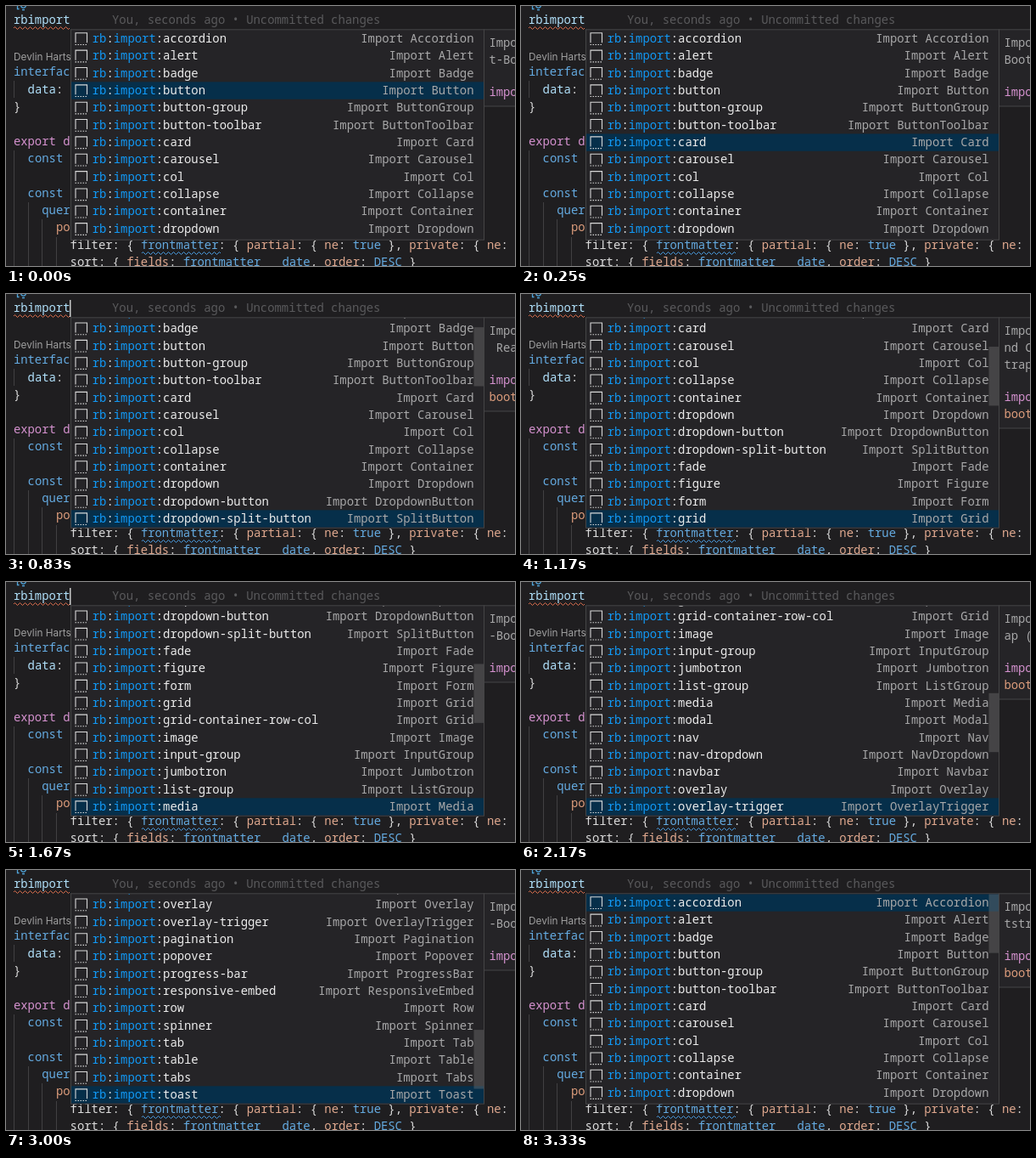
These frames come from a looping animation (600 by 306 pixels, 3.41 s). An HTML page:

```html
<!DOCTYPE html>
<html lang="en">
<head>
<meta charset="utf-8">
<title>Snippet suggestions</title>
<style>
  html, body { margin: 0; width: 100%; height: 100%; overflow: hidden; background: #1f1e20; }
  svg { display: block; width: 600px; height: 306px; }
  text { font: 500 13.88px "Noto Sans Mono", "DejaVu Sans Mono", monospace; white-space: pre; fill: #dcdcdc; }
  .lens { font: 11.8px Inter, Roboto, sans-serif; fill: #a0a0a0; }
  .blame { fill: #5a5a5c; font-weight: 400; }
  .key { fill: #64aae0; }
  .var { fill: #b0e0fa; }
  .flow { fill: #d592cf; }
  .str { fill: #dd9d7c; }
  .field { fill: #dfa88e; }
  .label { fill: #ececec; }
  .match { fill: #1199f6; }
  .detail { fill: #a8a8a9; font-weight: 400; }
  .panel { fill: #252427; stroke: #454546; }
  .icon { fill: none; stroke: #d8d8d8; stroke-width: 1.1; }
  .guide { stroke: #414042; }
  .wave { fill: none; stroke-width: 1; }
</style>
</head>
<body>
<svg id="stage" viewBox="0 0 600 306">
  <clipPath id="listClip"><rect x="77" y="28.3" width="487" height="246.4"/></clipPath>
  <g id="editor"></g>
  <rect id="cursor" x="75" y="7" width="1.5" height="20" fill="#c8c8c8"/>
  <g id="docs"></g>
  <rect class="panel" x="76.5" y="27.8" width="487" height="247.4"/>
  <g clip-path="url(#listClip)">
    <g id="list"><rect id="focus" x="77" width="486" height="20.35" fill="#062f4a"/></g>
    <rect id="thumb" x="551.5" width="11.5" fill="#797979" fill-opacity=".38"/>
  </g>
</svg>
<script>
const LOOP = 3410, TICK = 250 / 3;
const ROW = 20.35, TOP = 28.3, VIEW = 246.4, BASE = 4.5, CHAR = 8.34;
const FIRST = 3, WRAP = 23;

const names = `accordion alert badge button button-group button-toolbar card carousel col
  collapse container dropdown dropdown-button dropdown-split-button fade figure form grid
  grid-container-row-col image input-group jumbotron list-group media modal nav nav-dropdown
  navbar overlay overlay-trigger pagination popover progress-bar responsive-embed row spinner
  tab table tabs toast toggle-button toggle-button-group tooltip`.split(/\s+/);
const titles = { 'dropdown-split-button': 'SplitButton', 'grid-container-row-col': 'Grid' };
const docBreaks = {
  'accordion': ['Import Accordion', 'tstrap'],
  'overlay-trigger': ['Import OverlayTrigger', 'ap (overlay)']
};

const $ = id => document.getElementById(id);
const pascal = s => s.replace(/(^|-)(\w)/g, (_, dash, c) => c.toUpperCase());
const title = name => titles[name] || pascal(name);

function add(parent, tag, attrs, content) {
  const node = document.createElementNS('http://www.w3.org/2000/svg', tag);
  for (const key in attrs) node.setAttribute(key, attrs[key]);
  if (content) node.textContent = content;
  return parent.appendChild(node);
}

// Each run is "class|text"; a run without a class keeps the default colour.
function addRuns(parent, x, y, runs) {
  const line = add(parent, 'text', { x, y });
  for (const run of runs) {
    const [cls, content] = run.split('|');
    add(line, 'tspan', { class: cls }, content);
  }
}

function wave(x0, x1, y, stroke) {
  let d = `M${x0} ${y}`;
  for (let x = x0, up = true; x < x1; x += 3, up = !up) d += `q1.5 ${up ? -3 : 3} 3 0`;
  add($('editor'), 'path', { d, stroke, class: 'wave' });
}

function buildEditor() {
  const g = $('editor');
  const lineY = n => 16.6 + n * ROW + BASE;
  const code = (n, indent, ...runs) => addRuns(g, 8.9 + indent * CHAR, lineY(n), runs);
  const guide = (indent, from, to) => {
    const x = Math.round(9 + indent * CHAR) + .5;
    add(g, 'path', { d: `M${x} ${from}V${to}`, class: 'guide' });
  };
  guide(0, 88, 108);
  [[0, 170], [2, 231], [4, 251], [6, 272]].forEach(([indent, y]) => guide(indent, y, 306));

  add(g, 'path', { d: 'M13.5 0v3.5h2M17.5 0a3.2 3.2 0 0 0 6 0M19 4.5h3', fill: 'none', stroke: '#4fa3d8', 'stroke-width': 1.3 });
  code(0, 0, 'var|rbimport');
  add(g, 'text', { x: 125, y: lineY(0), class: 'blame' }, 'You, seconds ago • Uncommitted changes');
  add(g, 'text', { x: 9, y: 63.5, class: 'lens' }, 'Devlin Hartsome');
  code(3, 0, 'key|interface');
  code(4, 2, 'var|data', '|:');
  code(5, 0, '|}');
  code(7, 0, 'flow|export', 'flow| default');
  code(8, 2, 'key|const');
  code(10, 2, 'key|const');
  code(11, 4, 'key|query');
  code(12, 6, 'str|posts');
  code(13, 8, '|filter: { ', 'key|frontmatter', '|: { ', 'field|partial', '|: { ',
    'field|ne', '|: ', 'key|true', '| }, ', 'field|private', '|: { ', 'field|ne', '|: ', 'key|true');
  code(14, 8, '|sort: { ', 'field|fields', '|: ', 'key|frontmatter___date', '|, ',
    'field|order', '|: ', 'key|DESC', '| }');
  wave(9, 75, 26, '#e0714f');
  wave(160, 251, 291, '#4a9fe6');
}

function buildList() {
  names.forEach((name, i) => {
    const g = add($('list'), 'g', { transform: `translate(0 ${TOP + i * ROW})` });
    const y = ROW / 2 + BASE;
    add(g, 'path', { class: 'icon', d: 'M82 15V3.5H95.5V15' });
    add(g, 'path', { class: 'icon', d: 'M81.5 17.2H96', 'stroke-dasharray': '1.5 1.5' });
    addRuns(g, 101.8, y, ['match|rb', 'label|:', 'match|import', 'label|:' + name]);
    add(g, 'text', { x: 551.5, y, class: 'detail', 'text-anchor': 'end' }, 'Import ' + title(name));
  });
}

function docLines(name) {
  if (docBreaks[name]) return docBreaks[name];
  const subject = name.startsWith('grid') ? 'Container, Row and Col' : title(name);
  return `Import ${subject} from React-Bootstrap`.match(new RegExp(`.{1,${WRAP}}`, 'g'));
}

function drawDocs(name) {
  const g = $('docs');
  g.replaceChildren();
  const lines = docLines(name);
  const wraps = name.startsWith('grid') || title(name).length > 7;
  const x = 569.4, lineHeight = 20;
  const codeY = 43 + lines.length * lineHeight + 18.5;
  const bottom = codeY + (wraps ? 36.5 : 16.5);
  add(g, 'rect', { class: 'panel', x: 563.5, y: 27.8, width: 60, height: bottom - 27.8 });
  lines.forEach((line, i) =>
    add(g, 'text', { x, y: 43 + i * lineHeight + BASE, class: 'detail' }, line));
  addRuns(g, x, codeY + BASE, ['flow|import']);
  if (wraps) addRuns(g, x, codeY + lineHeight + BASE, ['str|bootstrap']);
}

// Key repeat runs at 12 steps a second, on a 10 ms clock.
const stepTime = step => Math.round(step * TICK / 10) * 10;
function stepAt(t) {
  const step = Math.floor(t / TICK) + 1;
  return stepTime(step) <= t ? step : stepTime(step - 1) <= t ? step - 1 : step - 2;
}

let shown = -1;
function render(t) {
  const step = Math.min(stepAt(t), 40);
  if (step === shown) return;
  shown = step;
  const index = (FIRST + step) % names.length;
  const scroll = Math.max(0, (index + 1) * ROW - VIEW);
  const ratio = VIEW / (names.length * ROW);
  $('focus').setAttribute('y', TOP + index * ROW);
  $('list').setAttribute('transform', `translate(0 ${-scroll})`);
  $('thumb').setAttribute('y', TOP + scroll * ratio);
  $('thumb').setAttribute('height', VIEW * ratio);
  $('thumb').setAttribute('visibility', step >= 9 ? 'visible' : 'hidden');
  const blink = stepTime(step) % 1000;
  $('cursor').setAttribute('visibility', blink >= 450 && blink < 950 ? 'visible' : 'hidden');
  drawDocs(names[index]);
}

buildEditor();
buildList();
const start = performance.now();
function tick() {
  render((performance.now() - start) % LOOP);
  requestAnimationFrame(tick);
}
tick();
</script>
</body>
</html>
```
